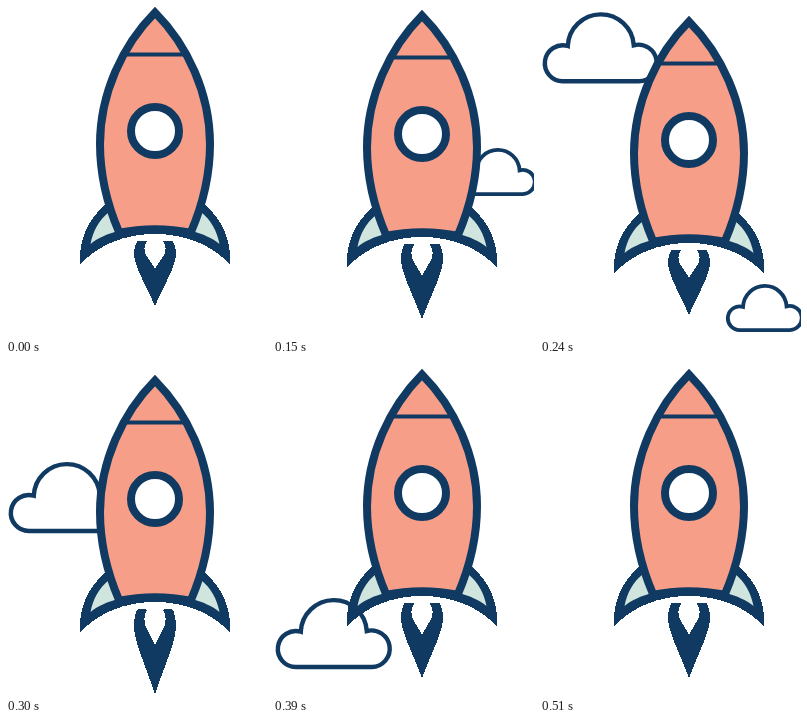
Recreate the animation shown at these times as an HTML page. Size 261 by 331 pixels, loop 540 ms.

```html
<!DOCTYPE html>
<html lang="en">
<head>
<meta charset="utf-8">
<title>Rocket</title>
<style>
  html, body { margin: 0; width: 100%; height: 100%; overflow: hidden; background: #fff; }
  svg { display: block; width: 261px; height: 331px; }
  .line { fill: none; stroke: #113a62; stroke-width: 8; }
  .navy { fill: #113a62; shape-rendering: crispEdges; }
  .coral { fill: #f69e87; }
  .mint { fill: #cfe5dd; }
  .white { fill: #fff; }
  .cloud { fill: #fff; stroke: #113a62; }
</style>
</head>
<body>
<svg viewBox="0 0 261 331">
  <defs>
    <path id="puff" d="M22 75A18 18 0 1 1 27 39.700A33.050 33.050 0 0 1 93 39A18.300 18.300 0 1 1 98 75Z"/>
    <path id="fin" class="mint" d="M103 206C93 214 87 225 84.500 238C92 232 101 228 112 225C108 219 105 213 103 206Z"/>
    <path id="hull" d="M113 226C101 198 94 168 94 138C94 88 116.500 39 149 6.500C181.500 39 204 88 204 138C204 168 197 198 185 226"/>
  </defs>
  <g id="left" class="cloud" stroke-width="4.400"><use href="#puff"/></g>
  <g id="right" class="cloud" stroke-width="5.800"><use href="#puff" transform="scale(.66)"/></g>
  <g id="rocket">
    <path id="flame" class="navy" d="M131 .5Q136 -.8 141 .5C138 5 137.500 10 140 14L149 27.500L158 14C160.500 10 160 5 157 .5Q162 -.8 167 .5C169 4 170 8 170 12C170 25 160 40 149 65C138 40 128 25 128 12C128 8 129 4 131 .5Z"/>
    <path class="navy" d="M101 197C82 213 73 233 73.500 259C92 239 118 228 149 228C180 228 206 239 224.500 259C225 233 216 213 197 197Z"/>
    <use href="#fin"/>
    <use href="#fin" transform="matrix(-1 0 0 1 298 0)"/>
    <path class="coral" d="M113 226L149 223L185 226L149 150Z"/>
    <use href="#hull" class="coral"/>
    <path class="line" style="stroke-width:4px" d="M118 48.500H180"/>
    <use href="#hull" class="line"/>
    <path class="line" d="M112 227Q149 219.500 186 227"/>
    <circle class="line" cx="149" cy="125" r="24" style="fill:#fff"/>
  </g>
</svg>
<script>
  const STEP = 30, STEPS = 18, FALL = 45.35;
  const [left, right, rocket, flame] =
    ["left", "right", "rocket", "flame"].map(id => document.getElementById(id));
  const move = (el, x, y, extra = "") =>
    el.setAttribute("transform", `translate(${x} ${y}) ${extra}`);
  const wave = (i, period) => (1 - Math.cos(2 * Math.PI * i / period)) / 2;

  function draw(i) {
    move(rocket, 0, 12 * wave(i, 6));
    move(flame, 0, 235, `scale(1 ${1 + 0.31 * wave(i, 4)})`);
    move(right, 185.2, 2.5 + FALL * (i - 2));
    move(left, 0.8, 0.3 + FALL * (i - 8));
  }

  function tick() {
    draw(Math.floor(performance.now() / STEP) % STEPS);
    requestAnimationFrame(tick);
  }
  tick();
</script>
</body>
</html>
```
